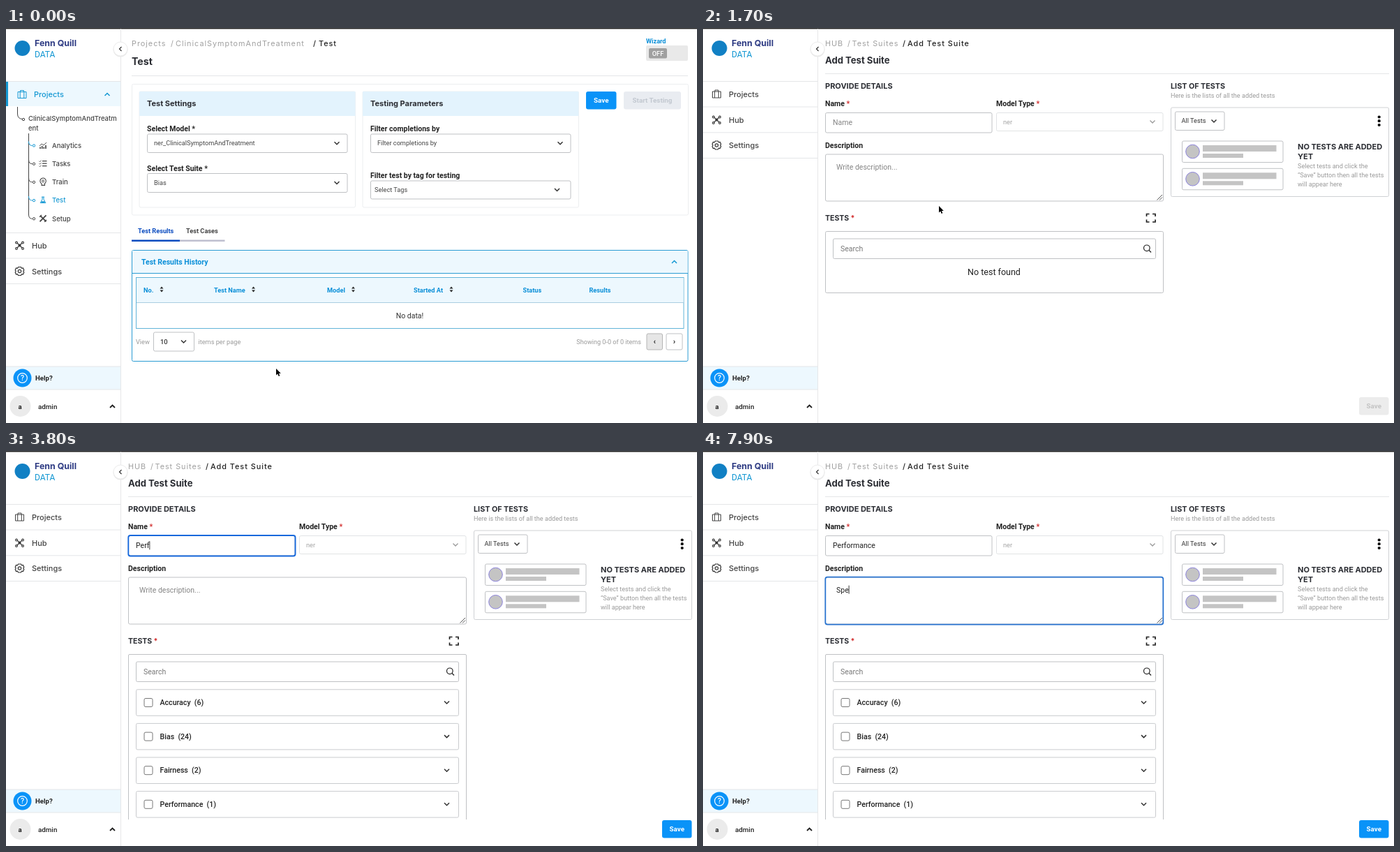
An HTML page that plays this animation: 990x566 px, repeating every 8000 ms.

```html
<!DOCTYPE html>
<html lang="en">
<head>
<meta charset="utf-8">
<title>Test suite walkthrough</title>
<style>
  html, body { margin: 0; width: 100%; height: 100%; overflow: hidden; background: #fff; }
  svg { display: block; width: 990px; height: 566px; font-family: Roboto, sans-serif; }
  text { white-space: pre; }
  .wide { font-family: Inter, sans-serif; }
  .crumb { letter-spacing: 1px; }
</style>
</head>
<body>
<svg id="stage" viewBox="0 0 990 566"></svg>
<script>
const BLUE = '#0a93f8', SKY = '#1598d3', PALE = '#edf8fe', INK = '#222', DIM = '#9a9a9a', EDGE = '#bfc1c4';
const LOOP = 8000, STEP = 100;
const PROJECT = 'ClinicalSymptomAndTreatment';

// Drawing helpers: each returns SVG markup
const text = (x, y, s, size = 9.2, fill = INK, weight = 400, extra = '') =>
  `<text x="${x}" y="${y}" font-size="${size}" fill="${fill}" font-weight="${weight}" ${extra}>${s}</text>`;
const wide = (x, y, s, size, fill = '#2b2d33', weight = 700) =>
  text(x, y, s, size, fill, weight, 'class="wide"');
const crumb = (x, y, s, fill = '#a0a0a0', weight = 400) =>
  text(x, y, s, 10.8, fill, weight, 'class="wide crumb"');
const centered = (x, y, s, size, fill, weight) => text(x, y, s, size, fill, weight, 'text-anchor="middle"');
const box = (x, y, x2, y2, fill = '#fff', stroke = 'none', r = 0, extra = '') =>
  `<rect x="${x}" y="${y}" width="${x2 - x}" height="${y2 - y}" rx="${r}" fill="${fill}" stroke="${stroke}" ${extra}/>`;
const path = (d, stroke = INK, width = 1, extra = '') =>
  `<path d="${d}" fill="none" stroke="${stroke}" stroke-width="${width}" ${extra}/>`;
const dot = (x, y, r, fill = 'none', stroke = 'none', width = 1) =>
  `<circle cx="${x}" cy="${y}" r="${r}" fill="${fill}" stroke="${stroke}" stroke-width="${width}"/>`;
const rule = (x, x2, y, color = '#e4e6e8') => path(`M${x} ${y}H${x2}`, color);
const chevron = (x, y, up = false, color = '#333', width = 1.5) =>
  path(up ? `M${x - 3.5} ${y + 2}l3.5-3.5 3.5 3.5` : `M${x - 3.5} ${y - 2}l3.5 3.5 3.5-3.5`, color, width);
const group = (id, ...parts) => `<g id="${id}">${parts.join('')}</g>`;
const at = (x, y, s) => `<g transform="translate(${x} ${y})">${s}</g>`;
const star = ' <tspan fill="#d32f2f">*</tspan>';

// Icons centred on 0,0
const briefcase = c => path('M-6-3.5H6V5.5H-6ZM-2.5-3.5V-5.5H2.5V-3.5M-2.8-3.5V5.5M2.8-3.5V5.5', c);
const hub = () => path('M-4-4L4 4M4-4L-4 4', '#333', 1.1) + dot(0, 0, 2, '#333') +
  [[-4.5, -4], [4.5, -4], [-4.5, 4.5], [4.5, 4.5]].map(([x, y]) => dot(x, y, 1.4, '#fff', '#333', 1.1)).join('');
const gear = () => path('M-2-6H2L3-4.2 5-4.5 6.3-1.5 5.3 0 6.3 1.5 5 4.5 3 4.2 2 6H-2L-3 4.2-5 4.5-6.3 1.5-5.3 0-6.3-1.5-5-4.5-3-4.2Z', '#333', 1.2) +
  dot(0, 0, 2.2, 'none', '#333', 1.2);
const treeIcons = [
  () => path('M-5 1l3-3 3 2 4-4', '#555') + path('M-4 5V2.5M-1.3 5V1M1.3 5V2.5M4 5V0', '#555', 1.8),
  () => path('M-1-3.5H5.5M-1 0H5.5M-1 3.5H5.5', '#444', 1.2) + path('M-5.5-3.5l1 1 2-2M-5.5 0l1 1 2-2M-5.5 3.5l1 1 2-2', '#444', .9),
  () => path('M-2 5V2.5A4.2 4.2 0 1 1 2.5 2.3V5Z', '#444', 1.1) + dot(0, -1, 1.5, 'none', '#444'),
  () => path('M-2-4.5H2M-1-4.5V-1L-3.8 4H3.8L1-1V-4.5', SKY) + path('M-2.5 2.7H2.5', SKY, 2),
  () => path('M-4.5 4.5L4.5-4.5M-4-4L4.5 4.5', '#444', 1.8) + path('M-5-2l3-3M2 5l3-3', '#444', 1.2),
];

const navItem = (y, label, icon) => at(19.5, y, icon) + wide(37, y + 4, label, 11, '#444', 500);

const shell = () => [
  box(0, 0, 990, 1.4, '#222'),
  path('M164.5 1V566', '#e6e7e9'),
  dot(23.5, 29, 11, '#1180c4'),
  wide(41, 26, 'Fenn Quill', 12.4, '#2f3c84'),
  text(41, 41.5, 'DATA', 12, SKY),
  dot(164, 31, 10.5, '#e9e9e9'), dot(164, 30, 10, '#fff', '#ececec'),
  path('M165.5 27l-3 3 3 3', '#333', 1.2),
  rule(0, 164, 76.5),
  box(0, 485, 164, 518, PALE), rule(0, 164, 485), rule(0, 164, 518),
  dot(23.5, 501.5, 13, BLUE), dot(23.5, 501.5, 6.8, 'none', '#fff', 1.2),
  centered(23.5, 505.3, '?', 10.5, '#fff', 500),
  text(42, 505, 'Help?', 9.6, INK, 600),
  dot(20.5, 542, 15, '#ebebeb'), centered(20, 545.5, 'a', 9.6, INK, 600),
  text(46, 545.5, 'admin', 9.8, INK, 500),
  chevron(152.5, 542, true, INK, 1.8),
].join('');

const tree = () => ['Analytics', 'Tasks', 'Train', 'Test', 'Setup'].map((label, i) => {
  const y = 168.5 + i * 26.2, active = label === 'Test', c = active || !i ? SKY : '#444';
  return path(`M32.5 ${y - 6}q0 6 5 6`, c) + dot(40, y, 1.7, '#fff', c) + at(53, y - .5, treeIcons[i]()) +
    wide(66, y + 3.3, label, 9.5, active ? SKY : '#444', 500);
}).join('');

const select = (x, y, y2, label, textX = x + 10, arrowX = x + 272) =>
  box(x + .5, y, x + 287, y2, '#fff', EDGE, 2) + text(textX, (y + y2) / 2 + 3, label, 9.2, '#444') +
  chevron(arrowX, (y + y2) / 2);
const panel = (x, x2, title) =>
  box(x, 91, x2, 257, '#fff', '#eceef0', 2) + box(x, 91, x2, 126, '#e3f3fd') + wide(x + 11, 112, title, 11);
const label = (x, y, s) => text(x, y, s, 10.5, INK, 600);
const button = (x, y, x2, s, fill, color) =>
  box(x, y, x2, y + 25.5, fill, 'none', 3) + centered((x + x2) / 2, y + 16, s, 9.8, color, 600);
const sortMark = x => `<path d="M${x - 2.5} 373.5l2.5-3 2.5 3zM${x - 2.5} 375.5l2.5 3 2.5-3z" fill="#222"/>`;

const testPage = () => group('testPage',
  box(0, 77, 164, 112, PALE), box(0, 77, 3, 112, SKY), at(23, 95, briefcase(SKY)),
  wide(40, 98.5, 'Projects', 11, SKY, 500), chevron(145, 95, true, SKY),
  path('M16.5 113V123q0 7 7 7.5', '#444'), dot(25, 131, 1.7, '#fff', '#444'),
  wide(32, 133, PROJECT.slice(0, 24), 9.5, '#444', 500), wide(32, 147, PROJECT.slice(24), 9.5, '#444', 500),
  path('M32.5 151V268', '#444'), tree(),
  [293.5, 330, 366.5].map(y => rule(0, 164, y)).join(''),
  navItem(311.5, 'Hub', hub()), navItem(348.5, 'Settings', gear()),
  crumb(180, 26, 'Projects'), crumb(236, 26, '/'), crumb(243, 26, PROJECT),
  crumb(440, 26, '/', INK, 500), crumb(448, 26, 'Test', INK, 500),
  wide(180, 53, 'Test', 14.2),
  text(917, 21.5, 'Wizard', 9.2, '#0a8fd8', 600),
  box(917, 25, 977, 47, '#e9e9e9', 'none', 2), box(921, 29, 947, 43.5, '#a0a0a0', 'none', 2),
  centered(934, 39.5, 'OFF', 9.2, '#fff', 500),
  rule(180, 977, 68.5),
  box(180.5, 80.5, 977.5, 268, '#fff', '#eceef0', 2),
  panel(191, 500.5, 'Test Settings'), panel(511, 820.5, 'Testing Parameters'),
  label(202, 147.5, 'Select Model *'), select(202, 152, 178.5, 'ner_' + PROJECT),
  label(202, 204.5, 'Select Test Suite *'), select(202, 208.5, 235.5, 'Bias'),
  label(522, 147.5, 'Filter completions by'), select(522, 152, 178.5, 'Filter completions by'),
  label(522, 215, 'Filter test by tag for testing'), select(522, 219, 245, 'Select Tags', 528, 789.5),
  button(831, 91, 874.5, 'Save', BLUE, '#fff'), button(885, 91, 967, 'Start Testing', '#e9ecf1', '#c2c8d0'),
  text(189, 294, 'Test Results', 9.2, '#0b4cc0', 600), text(258, 294, 'Test Cases', 9.2, '#444', 600),
  box(180, 303.5, 249, 306, '#0b4cc0'), box(249, 303.5, 313.5, 306, '#bfc0d0'),
  box(180.5, 318.5, 977, 477.5, '#fff', '#2a9bd3', 2), box(181, 319, 976.5, 351.5, PALE),
  rule(181, 977, 351.5, '#2a9bd3'),
  text(194, 338.5, 'Test Results History', 10.5, '#0a8fd8', 600), chevron(957.5, 335, true, SKY),
  box(186.5, 357.5, 971, 430.5, '#fff', '#62b4d8'), box(187, 358, 970.5, 393, PALE), rule(187, 971, 393.5, '#a9cde0'),
  [[197, 'No.'], [298, 'Test Name'], [460, 'Model'], [584, 'Started At'], [740.5, 'Status'], [835.5, 'Results']]
    .map(([x, s]) => text(x, 378.5, s, 9.2, '#0a8fd8', 600)).join(''),
  [223, 354.5, 497.5, 638].map(sortMark).join(''),
  centered(578.5, 415.5, 'No data!', 10.5, '#333'),
  text(186, 452.5, 'View', 9.2, DIM), box(211.5, 436, 269.5, 463, '#fff', EDGE, 2),
  text(221, 452.8, '10', 9.4, '#333', 500), chevron(254.5, 449.5), text(275.5, 452.5, 'items per page', 9.2, DIM),
  text(910, 452.5, 'Showing 0-0 of 0 items', 9.1, DIM, 400, 'text-anchor="end"'),
  box(918, 438, 940.5, 461, '#e6e6e6', '#b5b5b5', 2), box(946, 438, 969, 461, '#fff', EDGE, 2),
  centered(929.3, 453, '‹', 11, INK, 700), centered(957.5, 453, '›', 11, INK, 700),
  group('menu',
    box(202.5, 208.5, 489, 235.5, PALE, '#2a9bd3', 2), text(212, 225, 'Bias', 9.2, SKY), chevron(474, 222, true, SKY),
    box(202.5, 237, 489.5, 403, '#fff', '#e9ebed', 1, 'filter="drop-shadow(0 1px 1.5px #0002)"'),
    group('menuHover', box(203, 238, 489, 270.5, '#f1f9fe')),
    path('M218.5 250.5V258.5M214.5 254.5H222.5', '#333', 1.2), text(230, 257.8, 'Create New Test Suite', 9.2, '#444'),
    ['UppercaseAndSpeed', 'UppercaseAndLowercase', 'Uppercase', 'Bias'].map((s, i) =>
      rule(203, 489, 270.8 + i * 32.9, '#e6eef3') + text(212, 290.6 + i * 32.8, s, 9.2, '#444')).join('')));

const ghostCard = y =>
  box(686.5, y, 831, y + 30.5, '#fff', EDGE, 2) + dot(701.5, y + 15, 9.8, '#c4c4c4', '#8b82dc') +
  box(716, y + 6, 821.5, y + 15, '#c4c4c4') + box(716, y + 18, 774, y + 24, '#c4c4c4');
const testRow = (s, i) => {
  const y = 341.8 + i * 48.6;
  return box(186.5, y, 648.5, y + 37.5, '#fff', '#c9cbce', 2) + box(198, y + 12.7, 210, y + 24.7, '#fff', '#777', 2) +
    text(220.5, y + 22.2, s.replace(' ', '\u00a0\u00a0'), 10.6, INK, 500) + chevron(631.5, y + 18.7);
};

const suitePage = () => group('suitePage',
  [113, 149.8, 186.5].map(y => rule(0, 164, y)).join(''),
  navItem(94.5, 'Projects', briefcase('#444')), navItem(131.5, 'Hub', hub()), navItem(168, 'Settings', gear()),
  crumb(175, 26, 'HUB'), crumb(207, 26, '/'), crumb(213.5, 26, 'Test Suites'),
  crumb(286, 26, '/', INK, 500), crumb(293, 26, 'Add Test Suite', INK, 500),
  wide(175, 51, 'Add Test Suite', 13.1),
  rule(175, 983, 65.5),
  wide(175, 87, 'PROVIDE DETAILS', 11), wide(670, 87, 'LIST OF TESTS', 10.8),
  text(670, 100, 'Here is the lists of all the added tests', 9.1, DIM),
  label(175, 112, 'Name' + star), label(420, 112, 'Model Type' + star), label(175, 172, 'Description'),
  box(175.5, 121.5, 414, 150, '#fff', EDGE, 2), box(420.5, 121.5, 659, 147.5, '#fff', '#e1e3e5', 2),
  text(430, 137.5, 'ner', 9.2, '#a5a5a5'), chevron(644, 134.5, false, '#999', 1.3),
  box(175.5, 181, 659.5, 248, '#fff', EDGE, 2),
  group('nameRing', box(175.3, 121, 414.5, 150.5, 'none', '#1769dc', 3, 'stroke-width="1.9"')),
  group('noteRing', box(175.3, 180.7, 659.3, 248.6, 'none', '#2a74d0', 3, 'stroke-width="1.8"')),
  path('M650.5 246.5l7.5-7.5M654 246.5l4-4', '#555'),
  `<text id="name" x="186" y="139.3" font-size="10.5"/><text id="note" x="191" y="202.7" font-size="10.5"/>`,
  path('M0 0v12', INK, .9, 'id="caret"'),
  wide(175, 276, 'TESTS' + star, 10.5),
  path('M635.5 270V266.5H639.5M644 266.5H648V270M648 274.5V278H644M639.5 278H635.5V274.5', INK, 1.7),
  group('empty', box(175.5, 291.5, 659.5, 379.5, '#fff', EDGE, 2), centered(417, 354, 'No test found', 12.5, INK)),
  group('list', path('M175.5 528V293q0-1.5 1.5-1.5H658q1.5 0 1.5 1.5V528', EDGE),
    ['Accuracy (6)', 'Bias (24)', 'Fairness (2)', 'Performance (1)'].map(testRow).join('')),
  box(186.5, 302, 648.5, 330.5, '#fff', EDGE, 2), text(197, 319.8, 'Search', 10.5, '#777'),
  dot(635.8, 315.3, 4.3, 'none', INK, 1.2), path('M639 318.5l3 3', INK, 1.3),
  box(653.5, 66.5, 658.5, 430.5, '#7d7d7d', 'none', 2.5, 'id="scrollbar"'),
  box(670.5, 114, 982.5, 241.5, '#fff', '#cfd1d4', 2), box(676.5, 120, 747, 146.5, '#fff', EDGE, 2),
  text(685.5, 136.3, 'All Tests', 9.2, '#333'), chevron(732, 133.5),
  [127.5, 133.2, 139].map(y => dot(968.7, y, 2.1, '#111')).join(''),
  ghostCard(162), ghostCard(201.3),
  wide(852, 174, 'NO TESTS ARE ADDED', 11), wide(852, 188, 'YET', 11),
  ['Select tests and click the', '“Save” button then all the tests', 'will appear here']
    .map((s, i) => text(852, 201 + i * 13, s, 9.1, DIM)).join(''),
  group('saveOff', button(940, 529, 982.5, 'Save', '#ececec', '#c3c3c3')),
  group('saveOn', button(940, 529, 982.5, 'Save', BLUE, '#fff')));

const pointers = () =>
  `<path id="arrow" d="M0 0V9.6L2.2 7.6 3.7 11 5.3 10.3 3.9 7H6.8Z" fill="#000" stroke="#fff" stroke-width=".8" paint-order="stroke"/>` +
  path('M-2.3-5.5Q0-5.5 0-4V4Q0 5.5-2.3 5.5M2.3-5.5Q0-5.5 0-4M0 4Q0 5.5 2.3 5.5M-1.3 2H1.3', '#222', 1, 'id="beam"');

document.getElementById('stage').innerHTML = box(0, 0, 990, 566) + testPage() + suitePage() + shell() + pointers();

// Timeline: [ms, ...values]
const MOVES = [[0, 387, 488], [500, 357, 228], [700, 355, 222], [900, 352, 232], [1200, 340, 252], [1500, 338, 255],
  [1900, 338, 255], [2500, 249, 138], [6100, 249, 138], [6400, 252, 161], [6600, 252, 163], [6900, 243, 200]];
const NAME_KEYS = [3200, 3400, 3700, 3800, 4000, 4400, 5400, 5500, 5600, 5700, 5800];
const NOTE_KEYS = [7500, 7700, 7900];
const FOCUS_NAME = 2600, FOCUS_NOTE = 7100, NEXT_PAGE = 1700, LOADED = 2200;

const el = id => document.getElementById(id);
const show = (id, on) => el(id).style.display = on ? '' : 'none';
const between = (t, a, b) => t >= a && t < b;

function pointerAt(t) {
  const i = MOVES.findIndex(m => m[0] > t);
  if (i < 0) return MOVES.at(-1).slice(1);
  const [t0, x0, y0] = MOVES[i - 1], [t1, x1, y1] = MOVES[i];
  const k = (t - t0) / (t1 - t0), e = k * k * (3 - 2 * k);
  return [x0 + (x1 - x0) * e, y0 + (y1 - y0) * e];
}

function typeInto(id, value, placeholder, keys, t) {
  const count = keys.filter(k => k <= t).length;
  el(id).textContent = count ? value.slice(0, count) : placeholder;
  el(id).setAttribute('fill', count ? INK : '#858585');
  return count;
}

function drawCaret(t, id, count, keys, focused) {
  const since = t - (count ? keys[count - 1] : focused);
  show('caret', t >= FOCUS_NAME && since % 1000 < 500);
  const field = el(id), width = count ? field.getComputedTextLength() : 0;
  const x = +field.getAttribute('x') + width + .4, y = +field.getAttribute('y') - 10;
  el('caret').setAttribute('transform', `translate(${x} ${y})`);
}

function render(t) {
  const second = t >= NEXT_PAGE, inNote = t >= FOCUS_NOTE;
  show('testPage', !second);
  show('suitePage', second);
  show('menu', between(t, 600, NEXT_PAGE));
  show('menuHover', t >= 1100);
  show('empty', t < LOADED);
  show('list', t >= LOADED);
  show('nameRing', between(t, FOCUS_NAME, FOCUS_NOTE));
  show('noteRing', inNote);
  show('saveOn', t >= NAME_KEYS[0]);
  show('saveOff', t < NAME_KEYS[0]);
  el('scrollbar').style.opacity = t < LOADED ? 0 : Math.max(0, Math.min(1, (3400 - t) / 400));

  const nameCount = typeInto('name', 'Performance', 'Name', NAME_KEYS, t);
  const noteCount = typeInto('note', 'Spe', 'Write description...', NOTE_KEYS, t);
  if (inNote) drawCaret(t, 'note', noteCount, NOTE_KEYS, FOCUS_NOTE);
  else drawCaret(t, 'name', nameCount, NAME_KEYS, FOCUS_NAME + STEP);

  const [x, y] = pointerAt(t);
  const hidden = between(t, NAME_KEYS[0], 6100) || t >= NOTE_KEYS[0];
  const overField = second && (between(y, 121, 150) || between(y, 181, 248));
  show('arrow', !hidden && !overField);
  show('beam', !hidden && overField);
  for (const id of ['arrow', 'beam']) el(id).setAttribute('transform', `translate(${x} ${y})`);
}

const start = performance.now();
function tick() {
  const t = (performance.now() - start) % LOOP;
  render(Math.floor(t / STEP) * STEP);
  requestAnimationFrame(tick);
}
tick();
</script>
</body>
</html>
```
